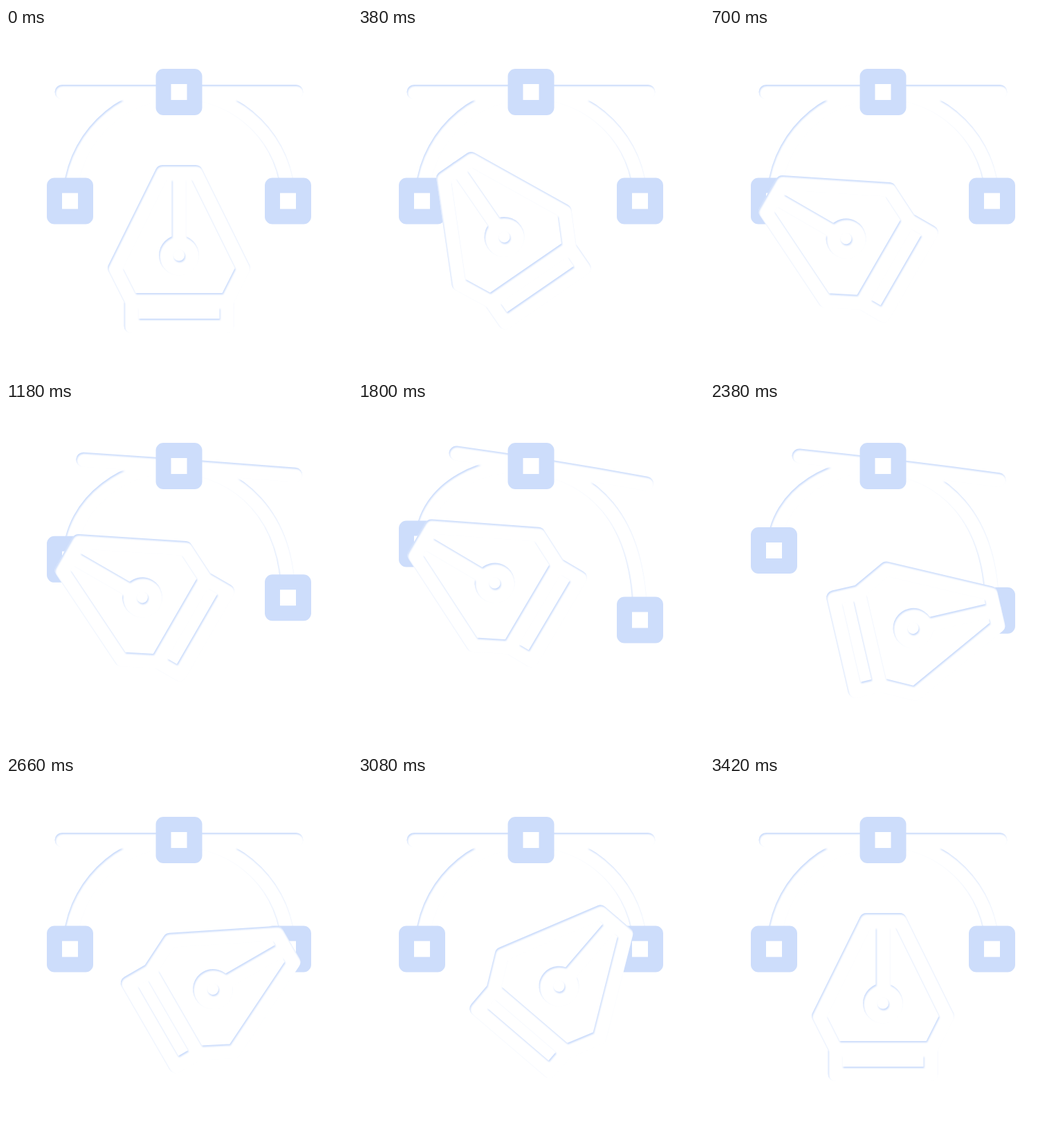
Recreate the animation shown at these times as an HTML page. Size 500 px wide and 500 px high, loop 3600 ms.

```html
<!DOCTYPE html>
<html lang="en">
<head>
<meta charset="utf-8">
<title>Pen tool</title>
<style>
  html, body { margin: 0; width: 100%; height: 100%; overflow: hidden; background: #fff; }
  svg { display: block; width: 100%; height: 100%; }
  .line { fill: none; stroke: #fff; stroke-width: 21; stroke-linecap: round; stroke-linejoin: round; }
  .node { fill: #fff; stroke: #cdddfb; stroke-width: 22; stroke-linejoin: round; }
</style>
</head>
<body>
<svg viewBox="0 0 500 500">
  <defs>
    <!-- soft blue shade along the upper left inside of each line -->
    <filter id="inset" filterUnits="userSpaceOnUse" x="0" y="0" width="500" height="500" color-interpolation-filters="sRGB">
      <feOffset in="SourceAlpha" dx="0.8" dy="2"/>
      <feGaussianBlur stdDeviation="1.2" result="soft"/>
      <feFlood flood-color="#c8dafb"/>
      <feComposite in2="SourceAlpha" operator="in"/>
      <feComposite in2="soft" operator="out" result="shade"/>
      <feMerge><feMergeNode in="SourceGraphic"/><feMergeNode in="shade"/></feMerge>
    </filter>
    <rect id="node" class="node" x="-22.5" y="-22.5" width="45" height="45"/>
    <!-- pen drawn around the middle of its base -->
    <path id="body" d="M-24-232.5H24L92.5-94 69-47.5H-69L-92.5-94ZM-69-47.5V-10.5H69V-47.5"/>
    <path id="slit" d="M0-232.5V-131M-18.5-112.5a18.5 18.5 0 1 0 37 0a18.5 18.5 0 1 0-37 0"/>
  </defs>
  <g class="line" filter="url(#inset)">
    <path id="arc"/>
    <path id="bar"/>
  </g>
  <use id="left" href="#node"/>
  <use href="#node" x="250" y="92.5"/>
  <use id="right" href="#node"/>
  <g class="pen" fill="#fff"><use href="#body"/></g>
  <g class="line" filter="url(#inset)">
    <g class="pen"><use href="#body"/><use href="#slit"/></g>
  </g>
</svg>
<script>
const LOOP = 3600;
const get = id => document.getElementById(id);
const pens = document.querySelectorAll('.pen');
const mix = (a, b, p) => a + (b - a) * p;

// cubic-bezier(.42, 0, .58, 1), solved by bisection
function ease(x) {
  if (x <= 0) return 0;
  if (x >= 1) return 1;
  let lo = 0, hi = 1, s;
  for (let i = 0; i < 24; i++) {
    s = (lo + hi) / 2;
    const r = 1 - s;
    if (1.26 * s * r * r + 1.74 * s * s * r + s * s * s < x) lo = s; else hi = s;
  }
  return s * s * (3 - 2 * s);
}
const span = (t, from, to) => ease((t - from) / (to - from));

// pen poses: x, y, angle
const rest = [250, 441, 0];
const atLeft = [294, 360.5, -60];
const leftUp = [294.8, 317, -60];
const rightLow = [179.2, 349.1, 81.5];
const atRight = [201.6, 364.3, 60];
const swing = [246, 545, 10.75]; // control point of the sweep across

const blend = (a, b, p) => a.map((v, i) => mix(v, b[i], p));

function pose(t) {
  if (t < 900) return blend(rest, atLeft, span(t, 0, 700));
  if (t < 1780) return blend(atLeft, leftUp, span(t, 900, 1460));
  if (t < 2250) {
    const p = span(t, 1780, 2250);
    return blend(blend(leftUp, swing, p), blend(swing, rightLow, p), p);
  }
  if (t < 2860) return blend(rightLow, atRight, span(t, 2250, 2660));
  return blend(atRight, rest, span(t, 2860, 3420));
}

function draw(now) {
  const t = now % LOOP;
  const q = span(t, 900, 1460) - span(t, 2250, 2660);

  // curve nodes and the handle bar
  const yl = 250 - 45 * q, yr = 250 + 65 * q;
  const ax = mix(81, 142, q), ay = mix(92.5, 74, q);
  const bx = mix(419, 416.5, q), by = mix(92.5, 118, q);
  const k = 87 / 169;
  const hl = [mix(250, ax, k), mix(92.5, ay, k)];
  const hr = [mix(250, bx, k), mix(92.5, by, k)];
  get('arc').setAttribute('d',
    `M92.5 ${yl}C92.5 ${yl - 87} ${hl} 250 92.5C${hr} 407.5 163 407.5 ${yr}`);
  get('bar').setAttribute('d',
    `M${ax} ${ay}Q${(ax + bx) / 2} ${(ay + by) / 2 - 3 * q} ${bx} ${by}`);
  get('left').setAttribute('transform', `translate(92.5 ${yl})`);
  get('right').setAttribute('transform', `translate(407.5 ${yr})`);

  const [x, y, angle] = pose(t);
  for (const pen of pens) pen.setAttribute('transform', `translate(${x} ${y}) rotate(${angle})`);
}

const start = performance.now();
function tick() {
  draw(performance.now() - start);
  requestAnimationFrame(tick);
}
tick();
</script>
</body>
</html>
```
